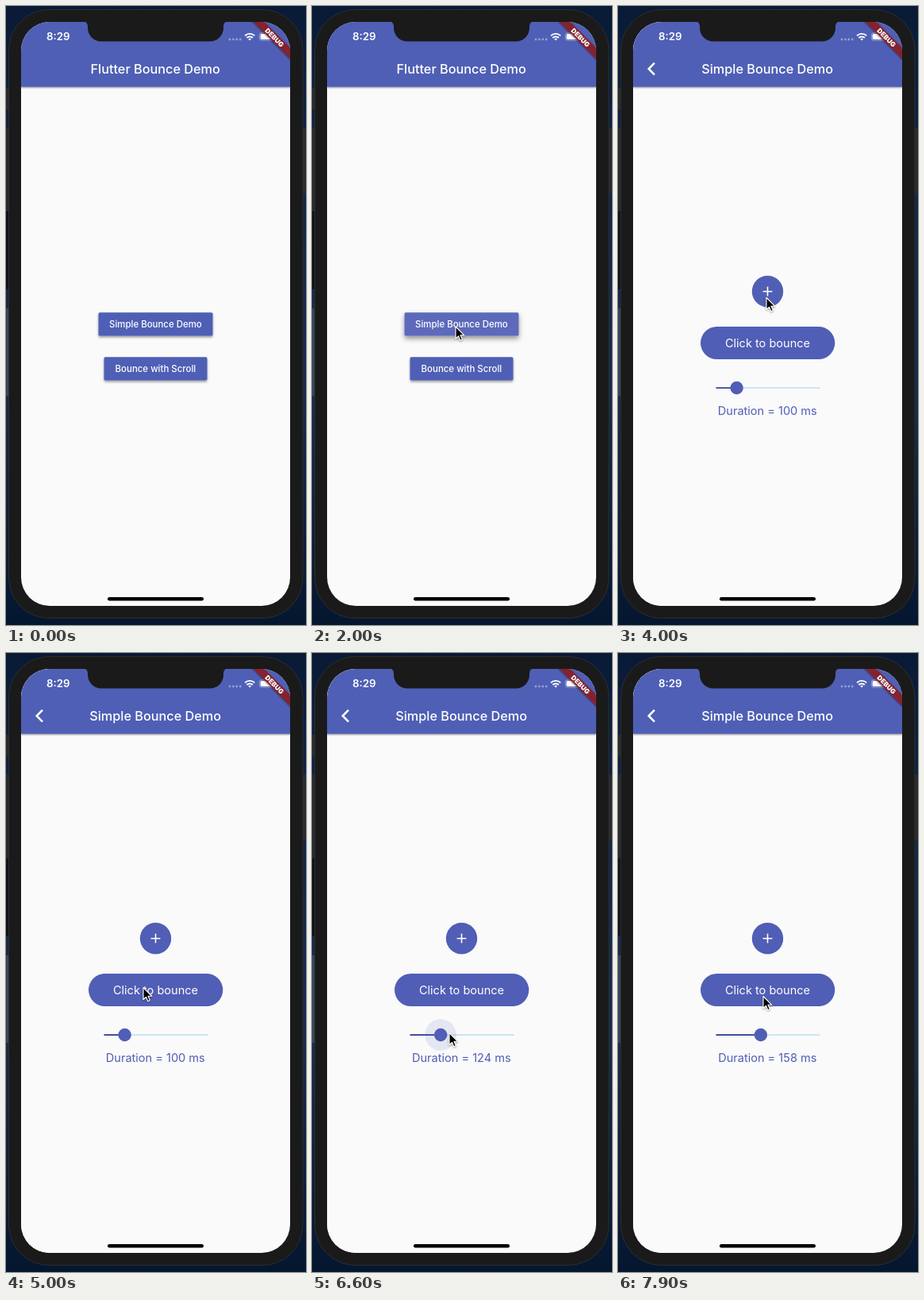
Animation of 378x778 px, one loop 8000 ms. Source, as an HTML page:

```html
<!DOCTYPE html>
<html lang="en">
<head>
<meta charset="utf-8">
<title>Flutter Bounce Demo</title>
<style>
  html, body { margin: 0; width: 100%; height: 100%; overflow: hidden; background: #0a1a33; }
  svg { display: block; width: 100vw; height: 100vh; }
  text { font-family: Inter, "Liberation Sans", sans-serif; fill: #fff; text-anchor: middle; }
  .title { font-size: 16.25px; font-weight: 500; }
  .label { font-size: 11.45px; font-weight: 500; }
  .large { font-size: 14.55px; }
  .indigo { fill: #505eb5; }
</style>
</head>
<body>
<svg viewBox="0 0 378 778">
  <defs>
    <clipPath id="screen"><rect x="19" y="20" width="339" height="734" rx="36"/></clipPath>
    <filter id="raised" x="-20%" y="-50%" width="140%" height="220%">
      <feDropShadow dx="0" dy="2" stdDeviation="1.8" flood-opacity=".38"/>
    </filter>
    <filter id="lifted" x="-20%" y="-50%" width="140%" height="220%">
      <feDropShadow dx="0" dy="3.5" stdDeviation="3" flood-opacity=".42"/>
    </filter>
    <filter id="soft" x="-20%" y="-20%" width="140%" height="140%">
      <feDropShadow dx="0" dy="1" stdDeviation="1.3" flood-opacity=".45"/>
    </filter>
    <linearGradient id="desk" x2="0" y2="1">
      <stop offset="0" stop-color="#081a35"/>
      <stop offset=".3" stop-color="#12264a"/>
      <stop offset=".62" stop-color="#182c4a"/>
      <stop offset="1" stop-color="#05162f"/>
    </linearGradient>
    <g id="bar">
      <rect x="19" y="20" width="339" height="734" fill="#fafafa"/>
      <rect class="indigo" x="19" y="10" width="339" height="91.6" filter="url(#soft)"/>
    </g>
  </defs>

  <!-- desktop behind the phone -->
  <rect width="378" height="778" fill="url(#desk)"/>
  <path d="M0 103h4v27H0zM0 153h4v105H0zM373 153h5v83h-5z" fill="#292a2c"/>
  <path d="M0 258h4v98H0z" fill="#101318"/>
  <path d="M0 380h4v110H0z" fill="#37465a"/>

  <rect x="3.5" y="4.5" width="370.5" height="765" rx="51" fill="#1a1a1a" stroke="#2c2e31"/>

  <g clip-path="url(#screen)">
    <g id="home">
      <use href="#bar"/>
      <text class="title" x="188.2" y="85">Flutter Bounce Demo</text>
      <rect id="simple" x="116.5" y="385.3" width="144" height="29.3" rx="1.7"/>
      <text class="label" x="188.4" y="404.2">Simple Bounce Demo</text>
      <rect class="indigo" x="123.5" y="441.2" width="130" height="29.3" rx="1.7" filter="url(#raised)"/>
      <text class="label" x="188.4" y="460">Bounce with Scroll</text>
    </g>

    <g id="demo">
      <use href="#bar"/>
      <path d="M46 71.7L38.7 79l7.3 7.3" fill="none" stroke="#fff" stroke-width="2.5"/>
      <text class="title" x="188.2" y="85">Simple Bounce Demo</text>
      <g id="plus">
        <circle class="indigo" cx="188.5" cy="358.7" r="19.7"/>
        <path d="M182.6 358.7h11.8M188.5 352.8v11.8" stroke="#fff" stroke-width="1.6"/>
      </g>
      <g id="pill">
        <rect class="indigo" x="104" y="403" width="169.3" height="41" rx="20.5"/>
        <text class="large" x="188.5" y="428.9">Click to bounce</text>
      </g>
      <path d="M123.5 480h131" stroke="#bcdcef" stroke-width="1.7"/>
      <path id="track" stroke="#434f98" stroke-width="1.8"/>
      <circle id="halo" class="indigo" cy="480" r="19.7"/>
      <circle id="thumb" class="indigo" cy="480" r="8.2"/>
      <text id="duration" class="large indigo" x="188.3" y="513.9"></text>
    </g>

    <!-- system chrome -->
    <path d="M97 19q6 1 6 7v2a17 17 0 0 0 17 16.5h137a17 17 0 0 0 17-16.5v-2q0-6 6-7z" fill="#1a1a1a"/>
    <text x="65.8" y="43.2" font-size="13.3" font-weight="600">8:29</text>
    <g fill="#fff" fill-opacity=".4">
      <circle cx="282" cy="42" r="1.4"/><circle cx="286.4" cy="42" r="1.4"/>
      <circle cx="290.8" cy="42" r="1.4"/><circle cx="295.2" cy="42" r="1.4"/>
    </g>
    <g fill="none" stroke="#fff" stroke-width="1.9">
      <path d="M301 37.4a8.6 8.6 0 0 1 12.2 0M303.3 40a5.4 5.4 0 0 1 7.6 0"/>
      <path d="M305.2 41.6a2.8 2.8 0 0 1 3.8 0l-1.9 2z" fill="#fff" stroke="none"/>
    </g>
    <rect x="319.3" y="33.8" width="19.4" height="9.4" rx="2.8" fill="none" stroke="#fff" stroke-opacity=".45" stroke-width=".9"/>
    <rect x="320.6" y="35.1" width="16.8" height="6.8" rx="1.6" fill="#fff"/>
    <path d="M339.8 36.8q1.8 1.7 0 3.4z" fill="#fff" fill-opacity=".5"/>
    <g transform="translate(338.3 39.7) rotate(45)">
      <rect x="-45" y="-4.9" width="90" height="9.8" fill="#84202f" filter="url(#soft)"/>
      <text y="3" font-size="8.4" font-weight="900">DEBUG</text>
    </g>
    <rect x="128" y="743" width="121" height="4.4" rx="2.2"/>
  </g>

  <path id="cursor" d="M0 0V15L3.5 11.8 5.8 17.2 8.3 16.1 6 10.8H10.8Z" stroke="#fff" stroke-width="1.1" stroke-linejoin="round" filter="url(#soft)"/>
</svg>

<script>
const LOOP = 8000, STEP = 100;
const $ = id => document.getElementById(id);
const clamp = v => Math.max(0, Math.min(1, v));
const ramp = (t, from, to) => clamp((t - from) / (to - from));
const smooth = p => p * p * (3 - 2 * p);

// Each key is [time, value, ...]; values ease from key to key.
function follow(keys, t) {
  const i = keys.findIndex(k => k[0] > t);
  if (i === 0) return keys[0].slice(1);
  if (i < 0) return keys.at(-1).slice(1);
  const a = keys[i - 1], b = keys[i], p = smooth(ramp(t, a[0], b[0]));
  return a.slice(1).map((v, n) => v + (b[n + 1] - v) * p);
}

const cursorKeys = [
  [0, -16, 590], [1100, 181, 403], [2600, 181, 403], [3100, 187, 366.5],
  [4000, 187, 366.5], [4400, 173, 420.5], [5100, 173, 420.5], [5350, 182, 438],
  [5700, 147, 475], [5850, 147, 475], [6600, 173, 477.5], [7400, 191, 477.5],
  [7600, 191, 477.5], [7900, 183, 431.5]
];
const durationKeys = [[5850, 100], [6600, 124], [7400, 158]];

// Shrinks linearly to 0.9 over 100 ms, then returns.
const bounce = (t, starts) =>
  1 - Math.max(...starts.map(s => 0.1 * clamp(1 - Math.abs(t - s - 100) / 100)));

const scaleAt = (el, s, x, y) =>
  el.setAttribute("transform", `translate(${x} ${y}) scale(${s}) translate(${-x} ${-y})`);

function draw(t) {
  const [cx, cy] = follow(cursorKeys, t);
  $("cursor").setAttribute("transform", `translate(${cx} ${cy})`);

  const slide = 1 - (1 - ramp(t, 2000, 2200)) ** 2;
  $("home").setAttribute("transform", `translate(${-113 * slide} 0)`);
  $("demo").setAttribute("transform", `translate(${339 * (1 - slide)} 0)`);
  $("demo").style.display = slide ? "" : "none";

  const pressed = t >= 1700;
  $("simple").setAttribute("fill", pressed ? "#5d69bb" : "#505eb5");
  $("simple").setAttribute("filter", `url(#${pressed ? "lifted" : "raised"})`);

  scaleAt($("plus"), bounce(t, [3550, 3750]), 188.5, 358.7);
  scaleAt($("pill"), bounce(t, [4750]), 188.5, 423.5);

  const [ms] = follow(durationKeys, t);
  const x = 123.5 + (ms - 50) * 0.522;
  $("thumb").setAttribute("cx", x);
  $("halo").setAttribute("cx", x);
  const held = ramp(t, 5800, 6000) * (1 - ramp(t, 7400, 7600));
  $("halo").setAttribute("r", 19.7 * held);
  $("halo").setAttribute("opacity", 0.13 * held);
  $("track").setAttribute("d", `M123.5 480H${x}`);
  $("duration").textContent = `Duration = ${Math.round(ms)} ms`;
}

const start = performance.now();
function tick() {
  const t = (performance.now() - start) % LOOP;
  draw(Math.floor(t / STEP) * STEP);
  requestAnimationFrame(tick);
}
tick();
</script>
</body>
</html>
```
